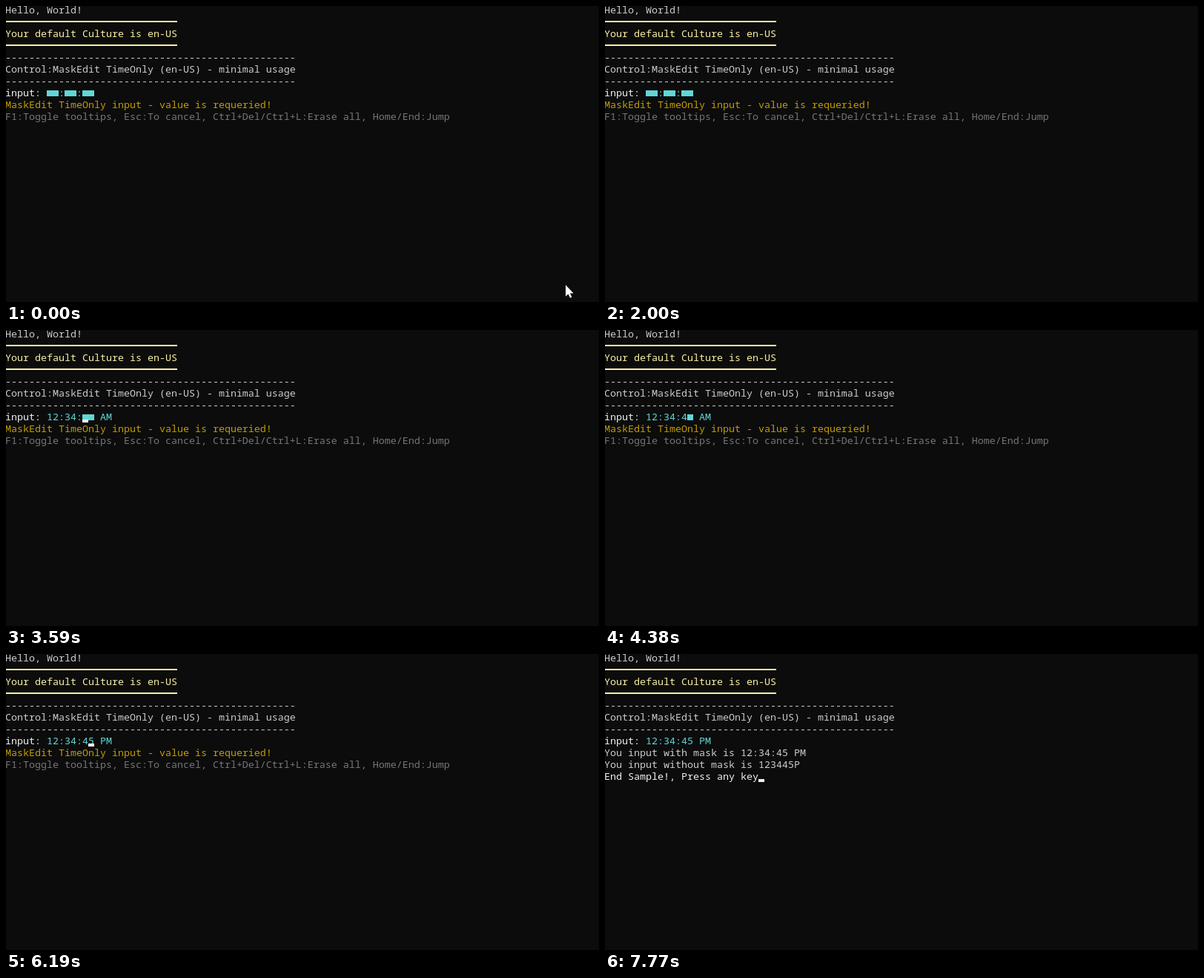
An HTML page that plays this animation: 800 px wide and 400 px high, repeating every 8 s.

```html
<!DOCTYPE html>
<html lang="en">
<head>
<meta charset="utf-8">
<title>MaskEdit TimeOnly</title>
<style>
  html, body { margin: 0; width: 100%; height: 100%; overflow: hidden; background: #0c0c0c; }
  svg { display: block; width: 800px; height: 400px; }
  text { font: 13.3333px "Noto Sans Mono", "DejaVu Sans Mono", monospace; white-space: pre; }
</style>
</head>
<body>
<svg id="stage" viewBox="0 0 800 400"></svg>
<script>
const LOOP = 8000, CELL = 8, LINE = 16;
const GRAY = '#cccccc', WHITE = '#f2f2f2', CREAM = '#f9f1a5',
      CYAN = '#61d6d6', GOLD = '#c19c00', DIM = '#767676';
const stage = document.getElementById('stage');

const colX = col => col * CELL - 1;
const baseline = row => 10 + row * LINE;

function add(tag, attrs, parent = stage) {
  const node = document.createElementNS('http://www.w3.org/2000/svg', tag);
  for (const key in attrs) node.setAttribute(key, attrs[key]);
  return parent.appendChild(node);
}

function print(row, str, fill, col = 0, parent = stage) {
  const node = add('text', { x: colX(col), y: baseline(row), fill }, parent);
  node.textContent = str;
  return node;
}

const rect = (x, y, width, height, fill, parent) =>
  add('rect', { x, y, width, height, fill }, parent);

const show = (node, on) => node.setAttribute('visibility', on ? 'visible' : 'hidden');

// Static header
print(0, 'Hello, World!', GRAY);
rect(0, 20, 231, 2, CREAM);
print(2, 'Your default Culture is en-US', CREAM);
rect(0, 52, 231, 2, CREAM);
print(4, '-'.repeat(49), GRAY);
print(5, 'Control:MaskEdit TimeOnly (en-US) - minimal usage', GRAY);
print(6, '-'.repeat(49), GRAY);
print(7, 'input:', WHITE);

// Masked field: two-digit groups split by colons
const field = print(7, '', CYAN, 7);
const blanks = [0, 1, 3, 4, 6, 7].map(i => ({ i, node: rect(colX(7 + i), 114, CELL, 8, CYAN) }));

const prompt = add('g', {});
print(8, 'MaskEdit TimeOnly input - value is requeried!', GOLD, 0, prompt);
print(9, 'F1:Toggle tooltips, Esc:To cancel, Ctrl+Del/Ctrl+L:Erase all, Home/End:Jump', DIM, 0, prompt);

const result = add('g', {});
print(8, 'You input with mask is 12:34:45 PM', GRAY, 0, result);
print(9, 'You input without mask is 123445P', GRAY, 0, result);
print(10, 'End Sample!, Press any key', WHITE, 0, result);

const caret = rect(0, 0, CELL, 4, WHITE);
const pointer = add('path', {
  d: 'M0 0V15.5L3.6 12.2L6 17.4L8.3 16.4L6 11.3H10.6Z', fill: '#fff'
});

// Time, typed text, AM/PM
const typing = [
  [0, '', ''], [2390, '1', 'AM'], [3190, '12:', 'AM'], [3390, '12:3', 'AM'],
  [3590, '12:34:', 'AM'], [4380, '12:34:4', 'AM'], [4580, '12:34:45', 'AM'],
  [5990, '12:34:45', 'PM']
];
// Time, caret visible
const blink = [
  [0, 0], [590, 1], [1000, 0], [1580, 1], [2000, 0], [2590, 1], [3190, 0], [3590, 1],
  [4180, 0], [4780, 1], [5170, 0], [5770, 1], [6980, 0], [7770, 1]
];
// Time, pointer position
const mouse = [[0, 755, 377], [200], [790, 396, 162], [1000]];
const DONE = 7770;

const at = (steps, t) => steps.findLast(step => step[0] <= t);

function draw(t) {
  const [, typed, half] = at(typing, t);
  const done = t >= DONE;
  const mask = '  :  :  ';
  field.textContent = typed + mask.slice(typed.length) + (half && ' ' + half);
  for (const { i, node } of blanks) show(node, i >= typed.length);
  show(prompt, !done);
  show(result, done);

  const row = done ? 10 : 7;
  const col = done ? 26 : 7 + Math.min(typed.length, 7);
  caret.setAttribute('x', colX(col));
  caret.setAttribute('y', baseline(row) - 1);
  show(caret, at(blink, t)[1]);

  const [, x, y] = at(mouse, t);
  show(pointer, x !== undefined);
  if (x !== undefined) pointer.setAttribute('transform', `translate(${x} ${y})`);
}

const start = performance.now();
function tick(now) {
  draw(Math.max(0, now - start) % LOOP);
  requestAnimationFrame(tick);
}
draw(0);
requestAnimationFrame(tick);
</script>
</body>
</html>
```
